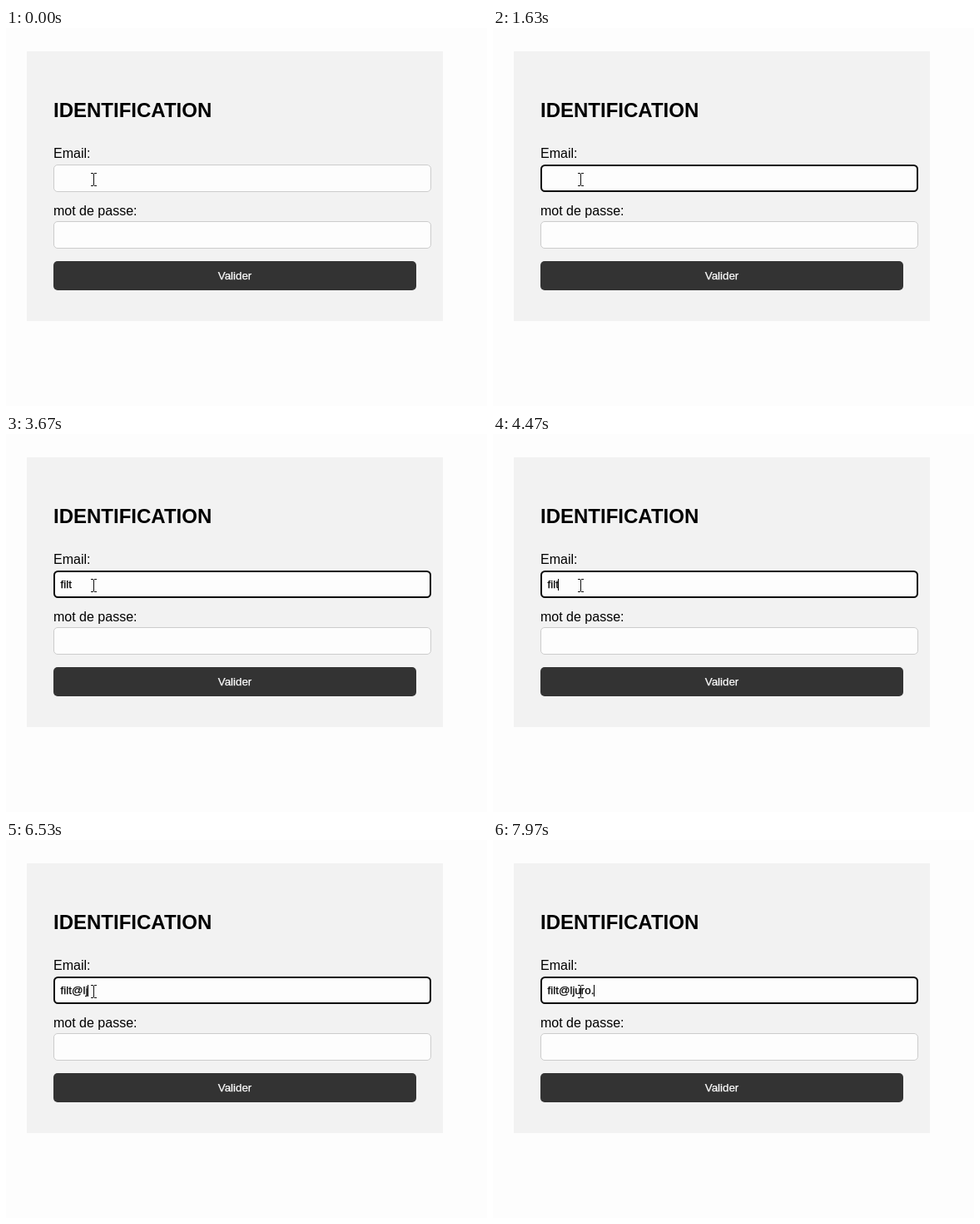
An HTML page for the animation above (8000 ms loop, 578 by 454 pixels).

```html
<!DOCTYPE html>
<html lang="fr">
<head>
<meta charset="utf-8">
<title>Identification</title>
<style>
  html, body { margin: 0; width: 100%; height: 100%; overflow: hidden; background: #fdfdfd; }
  svg { display: block; width: 100%; height: 100%; }
  text { font: 16px "Liberation Sans", Arial, sans-serif; font-variant-ligatures: none; white-space: pre; }
  .title { font-size: 24px; font-weight: bold; }
  .small { font-size: 13.333px; stroke: currentColor; stroke-width: .25; fill: currentColor; }
  .field { fill: #fdfdfd; stroke: #ccc; stroke-width: 1; }
  .crisp { shape-rendering: crispEdges; }
</style>
</head>
<body>
<svg viewBox="0 0 578 454">
  <rect width="578" height="454" fill="#fdfdfd"/>
  <rect class="crisp" x="25" y="28" width="500" height="324" fill="#f2f2f2"/>
  <text class="title" x="57" y="107">IDENTIFICATION</text>
  <text x="57" y="156">Email:</text>
  <rect class="field" x="57.5" y="164.5" width="453" height="32" rx="4.5"/>
  <rect id="ring" x="58" y="165" width="452" height="31" rx="4.5" fill="none" stroke="#0c0c0c" stroke-width="2"/>
  <text x="57" y="225">mot de passe:</text>
  <rect class="field" x="57.5" y="232.5" width="453" height="32" rx="4.5"/>
  <rect x="57" y="280" width="436" height="35" rx="5" fill="#333"/>
  <text class="small" x="275" y="302" text-anchor="middle" color="#fdfdfd">Valider</text>
  <text id="email" class="small" x="65.6" y="185" color="#000"></text>
  <rect id="caret" class="crisp" y="174" width="1" height="14"/>
  <path class="crisp" d="M102 174.5h3m1 0h3M105.5 175v14M102 189.5h3m1 0h3" fill="none" stroke="#111"/>
</svg>
<script>
  const LOOP = 8000, BLINK = 530, FOCUS = 605;
  const ADDRESS = "filt@ljuro.";
  const KEYS = [2130, 2430, 2760, 3060, 5000, 6080, 6380, 6750, 7050, 7350, 7700];
  const [ring, email, caret] = ["ring", "email", "caret"].map(id => document.getElementById(id));

  const show = (el, on) => el.setAttribute("visibility", on ? "visible" : "hidden");

  function render(t) {
    const count = KEYS.filter(k => k <= t).length;
    const last = count ? KEYS[count - 1] : FOCUS;
    const focused = t >= FOCUS;
    email.textContent = ADDRESS.slice(0, count);
    show(ring, focused);
    // The caret restarts its blink on each key press
    show(caret, focused && Math.floor((t - last) / BLINK) % 2 === 0);
    caret.setAttribute("x", Math.floor(65.6 + email.getComputedTextLength()));
  }

  const start = performance.now();
  function tick() {
    render((performance.now() - start) % LOOP);
    requestAnimationFrame(tick);
  }
  tick();
</script>
</body>
</html>
```
